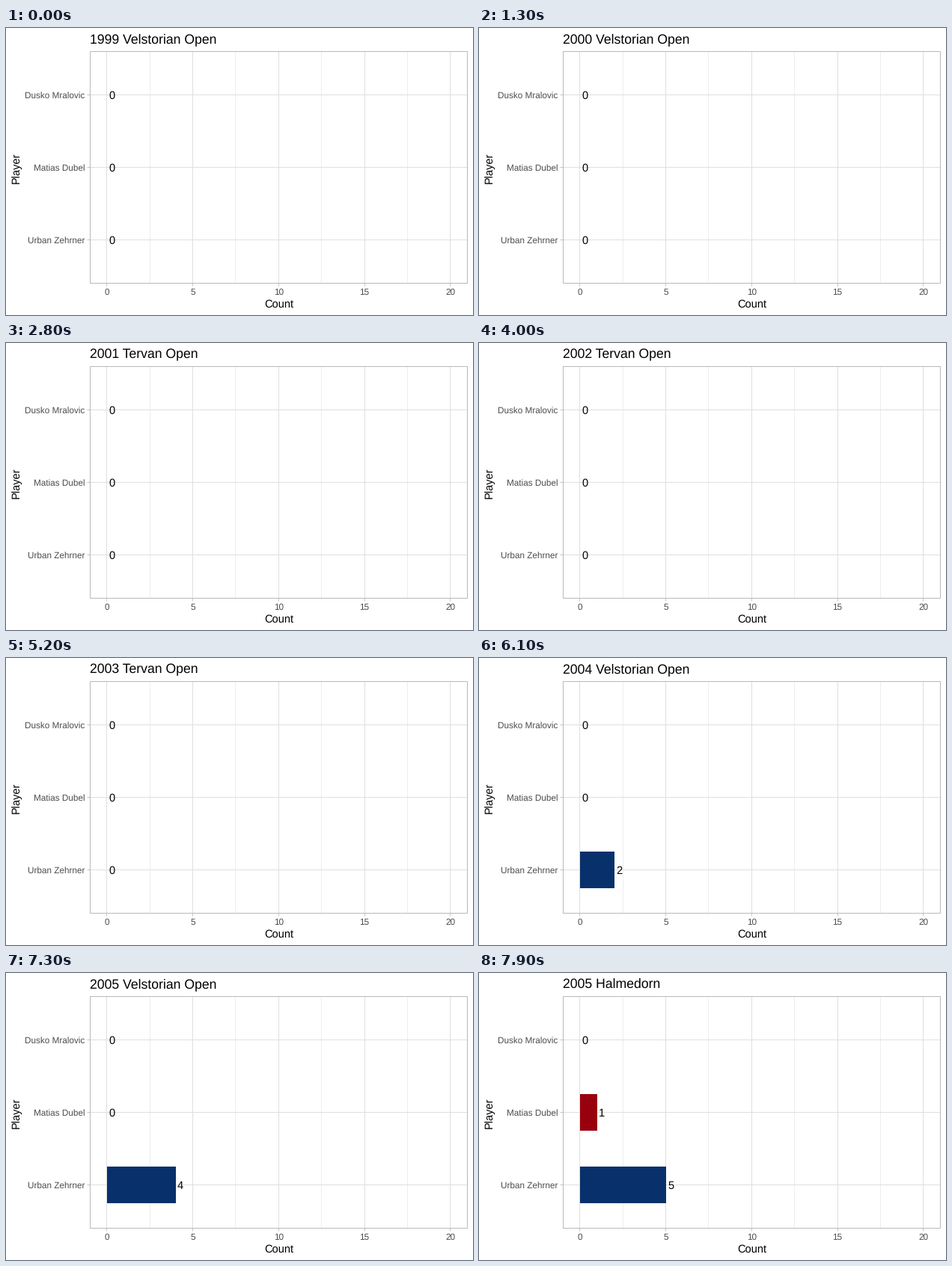
A matplotlib script for the animation above (8000 ms loop, 624x384 px).

```python
import math

import matplotlib.pyplot as plt
from matplotlib.animation import FuncAnimation
from matplotlib.patches import Rectangle

plt.rcParams["font.family"] = "Liberation Sans"
plt.rcParams["text.hinting"] = "none"

W, H, DPI = 624, 384, 96
LEFT, RIGHT, TOP, BOTTOM = 112, 616, 31, 341
X0, UNIT = 134.9, 22.94
ROW_STEP = 97
BAR_TOP, BAR_HEIGHT = 24, 49

EVENTS = ["Velstorian Open", "Tervan Open", "Halmedorn", "DV Open"]
FIRST_YEAR = 1999
# name, row centre, bar colour, indices of the events won
PLAYERS = [
    ("Dusko Mralovic", 89.4, "#1b6b2f", []),
    ("Matias Dubel", 186.4, "#99000d", [25]),
    ("Urban Zehrner", 283.4, "#08306b", [18, 20, 22, 23, 26]),
]

fig = plt.figure(figsize=(W / DPI, H / DPI), dpi=DPI, facecolor="white")
ax = fig.add_axes([0, 0, 1, 1])
ax.set_xlim(0, W)
ax.set_ylim(H, 0)
ax.axis("off")


def x_of(count):
    return X0 + UNIT * count


def line(xs, ys, color, z=1):
    """One-pixel line through the centres of the given pixels."""
    ax.plot([math.floor(x) + 0.5 for x in xs],
            [math.floor(y) + 0.5 for y in ys],
            color=color, lw=72 / DPI, snap=False, zorder=z,
            solid_capstyle="butt")


def label(x, y, text, size, color="black", ha="left", rotation=0):
    return ax.text(x, y, text, fontsize=size, color=color, ha=ha,
                   va="baseline", rotation=rotation,
                   rotation_mode="anchor", zorder=4)


# Grid, ticks and axis text
for count in (2.5, 7.5, 12.5, 17.5):
    line([x_of(count)] * 2, [TOP, BOTTOM], "#eeeeee")
for count in range(0, 21, 5):
    x = x_of(count)
    line([x, x], [TOP, BOTTOM], "#dfdfdf")
    line([x, x], [BOTTOM, BOTTOM + 4], "#c4c4c4")
    label(x, 357, str(count), 8.8, "#4d4d4d", "center")
for name, y, _, _ in PLAYERS:
    line([LEFT, RIGHT], [y, y], "#dfdfdf")
    line([LEFT - 4, LEFT], [y, y], "#c4c4c4")
    label(105.4, y + 4.6, name, 8.8, "#4d4d4d", "right")

ax.add_patch(Rectangle((LEFT + 0.5, TOP + 0.5), RIGHT - LEFT, BOTTOM - TOP,
                       fill=False, ec="#b9b9b9", lw=72 / DPI, snap=False,
                       zorder=5))

label(364.3, 374, "Count", 11, ha="center")
label(18, 186.8, "Player", 11, ha="center", rotation=90)
title = label(111.8, 20, "", 13.2)

bars, values = [], []
for _, y, color, _ in PLAYERS:
    bar = Rectangle((135, math.floor(y) - BAR_TOP), 0, BAR_HEIGHT,
                    fc=color, lw=0, snap=False, zorder=3)
    bars.append(ax.add_patch(bar))
    values.append(label(0, y + 5.6, "", 11))


def timeline(frame):
    """Event index, and how far the counts have moved to the next event."""
    if frame < 3:
        return 0, 0
    event = max(1, (frame - 1) // 3)
    moving = frame > 3 and (frame - 1) % 3 == 2
    return event, 0.5 if moving else 0


def wins_at(wins, event):
    return sum(win <= event for win in wins)


def draw(frame):
    event, part = timeline(frame)
    year, slot = divmod(event, len(EVENTS))
    title.set_text(f"{FIRST_YEAR + year} {EVENTS[slot]}")
    for (_, _, _, wins), bar, value in zip(PLAYERS, bars, values):
        now, after = wins_at(wins, event), wins_at(wins, event + 1)
        count = now + (after - now) * part
        bar.set_width(round(x_of(count)) - 135)
        text = f"{count:g}"
        # the gap is 0.3 of the text's own width
        value.set_text(text)
        value.set_x(x_of(count) + (2.4 if len(text) == 1 else 6.1))
    return [title, *bars, *values]


anim = FuncAnimation(fig, draw, frames=80, interval=100, repeat=True,
                     repeat_delay=0, blit=False)
plt.show()
```
